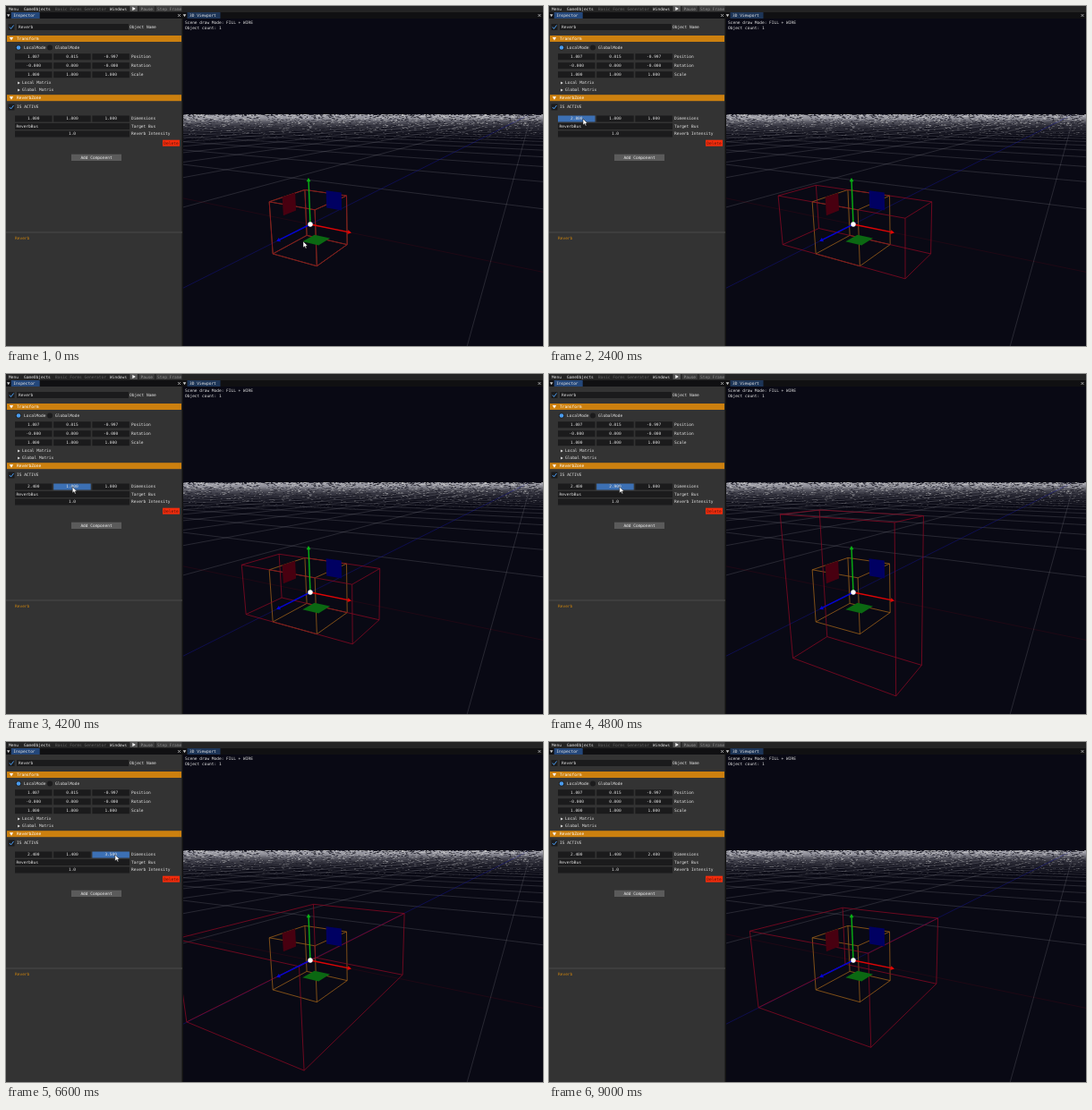
Write an HTML page with a canvas that moves like this. It is 600 px wide and 380 px high and loops after 9.4 s.

```html
<!DOCTYPE html>
<html>
<head>
<meta charset="utf-8">
<style>
  html, body { margin: 0; width: 100%; height: 100%; overflow: hidden; background: #000; }
  canvas { display: block; }
</style>
</head>
<body>
<canvas id="stage" width="600" height="380"></canvas>
<script>
const LOOP = 9400;
const view = document.getElementById('stage').getContext('2d');
let g = view;

// The camera is fixed by its focal length and the vanishing points of the x and z axes
const FOCAL = 345, CX = 399, CY = 197, HORIZON = 120, DEPTH = 5.8;
const unit = v => v.map(c => c / Math.hypot(...v));
const RISE = CY - HORIZON;
const AX = unit([663, RISE, -FOCAL]);
const AY = unit([0, -FOCAL, -RISE]);
const AZ = unit([-188.4, RISE, -FOCAL]);
const ORIGIN = [340, 244];
const CENTRE = [(ORIGIN[0] - CX) * DEPTH / FOCAL, (ORIGIN[1] - CY) * DEPTH / FOCAL, DEPTH];

const toCamera = (x, y, z) => CENTRE.map((c, i) => c + x * AX[i] + y * AY[i] + z * AZ[i]);
const toScreen = p => [CX + FOCAL * p[0] / p[2], CY + FOCAL * p[1] / p[2]];
const project = (x, y, z) => toScreen(toCamera(x, y, z));

function rect(x, y, w, h, color) {
  g.fillStyle = color;
  g.fillRect(x, y, w, h);
}

function line(a, b, color, width = 1) {
  g.strokeStyle = color;
  g.lineWidth = width;
  g.beginPath();
  g.moveTo(...a);
  g.lineTo(...b);
  g.stroke();
}

function poly(points, color) {
  g.fillStyle = color;
  g.beginPath();
  points.forEach(p => g.lineTo(...p));
  g.closePath();
  g.fill();
}

function triangle(x, y, r, angle, color) {
  const tip = i => angle + i * Math.PI * 2 / 3;
  poly([0, 1, 2].map(i => [x + r * Math.cos(tip(i)), y + r * Math.sin(tip(i))]), color);
}

function disc(x, y, r, color) {
  g.fillStyle = color;
  g.beginPath();
  g.arc(x, y, r, 0, Math.PI * 2);
  g.fill();
}

function text(s, x, y, color = '#e4e4e4', align = 'left') {
  g.font = '4.5px "DejaVu Sans Mono", monospace';
  g.textBaseline = 'middle';
  g.textAlign = align;
  g.fillStyle = color;
  g.fillText(s, x, y + .3);
}

function clipToViewport(top) {
  g.save();
  g.beginPath();
  g.rect(198, top, 402, 380 - top);
  g.clip();
}

function groundLine(x0, z0, x1, z1, color) {
  const a = toCamera(x0, 0, z0), b = toCamera(x1, 0, z1), near = .2;
  if (a[2] < near && b[2] < near) return;
  const clip = (p, q) => {
    if (p[2] >= near) return p;
    const k = (near - p[2]) / (q[2] - p[2]);
    return p.map((v, i) => v + (q[i] - v) * k);
  };
  line(toScreen(clip(a, b)), toScreen(clip(b, a)), color, .9);
}

function drawGround() {
  rect(198, 14, 402, 366, '#090914');
  clipToViewport(HORIZON + 1);
  const far = 120, step = 3.16, gray = 'rgba(155,155,165,.24)';
  for (let i = -far; i <= far; i++) {
    const d = i * step, end = far * step;
    groundLine(d, -end, d, end, i ? gray : 'rgba(20,20,150,.5)');
    groundLine(-end, d, end, d, i ? gray : 'rgba(90,10,25,.3)');
  }
  // Shimmer of the grid near the horizon
  let seed = 7;
  const rnd = () => (seed = seed * 16807 % 2147483647) / 2147483647;
  for (let i = 0; i < 2600; i++) {
    const k = rnd() ** 2, x = 198 + rnd() * 402, y = HORIZON + 1 + k * 32;
    const shade = rnd() < .45 ? '205,205,205' : '9,9,20';
    rect(Math.floor(x), Math.floor(y), 1 + rnd() * 2, 1, `rgba(${shade},${.5 * (1 - k)})`);
  }
  g.restore();
}

const FIELD = '#1b1b1c', FIELD_W = 41.5, ROW_DIMS = 126;
const column = i => 10 + 43.2 * i;

function field(x, y, w, value, color = FIELD) {
  rect(x, y - 3.5, w, 7, color);
  text(value, x + w / 2, y, '#e4e4e4', 'center');
}

function vectorRow(y, values, label) {
  values.forEach((v, i) => field(column(i), y, FIELD_W, v));
  text(label, 140, y);
}

function checkbox(y) {
  rect(2.5, y - 3.5, 7, 7, FIELD);
  line([4, y], [5.5, y + 2], '#4a9cf0');
  line([5.5, y + 2], [8.5, y - 2], '#4a9cf0');
}

function radio(x, label, on) {
  disc(x, 46.5, 3, FIELD);
  if (on) disc(x, 46.5, 2.3, '#4a9cf0');
  text(label, x + 6, 46.5);
}

function header(y, label) {
  rect(1, y - 3.5, 195, 7, '#cc800f');
  triangle(6, y - .3, 2.4, Math.PI / 2, '#fff');
  text(label, 12, y, '#fff');
}

function titleTab(x, w, label, closeX, color) {
  rect(x + 5, 7, w, 7, color);
  triangle(x + 2, 10.2, 2, Math.PI / 2, '#ccc');
  text(label, x + 7.5, 10.5);
  for (const s of [-1.5, 1.5]) line([closeX - 1.5, 10.5 - s], [closeX + 1.5, 10.5 + s], '#ccc', .7);
}

function drawMenu() {
  rect(0, 0, 600, 7, '#242424');
  rect(138.5, 0, 8.5, 6, '#555');
  rect(148.5, 0, 17.5, 6, '#3c3c3c');
  rect(167.5, 0, 29, 6, '#3c3c3c');
  triangle(142.5, 3, 2.4, 0, '#fff');
  const y = 3.5;
  text('Menu', 3, y);
  text('GameObjects', 20, y);
  text('Basic Forms Generator', 55, y, '#646464');
  text('Windows', 116, y);
  text('Pause', 150.5, y, '#999');
  text('Step Frame', 169, y, '#888');
}

function drawPanels() {
  rect(0, 0, 198, 380, '#333');
  drawMenu();
  rect(0, 7, 600, 7, '#101012');
  rect(196.5, 7, 1.5, 373, '#121212');
  titleTab(.7, 32, 'Inspector', 193.5, '#24477a');
  titleTab(197.5, 37, '3D Viewport', 596, '#1d3557');

  checkbox(23.5);
  rect(12, 20, 125, 7, FIELD);
  text('Reverb', 14, 23.5);
  text('Object Name', 138, 23.5);
  header(36.5, 'Transform');
  radio(14, 'LocalMode', true);
  radio(49, 'GlobalMode', false);
  vectorRow(56.7, ['1.007', '0.015', '-0.997'], 'Position');
  vectorRow(66.7, ['-0.000', '0.000', '-0.000'], 'Rotation');
  vectorRow(76.7, ['1.000', '1.000', '1.000'], 'Scale');
  ['Local Matrix', 'Global Matrix'].forEach((s, i) => {
    triangle(14, 86 + 8 * i, 1.8, 0, '#e4e4e4');
    text(s, 18, 86 + 8 * i);
  });

  header(102.7, 'ReverbZone');
  checkbox(113);
  text('IS ACTIVE', 12, 113);
  text('Dimensions', 140, ROW_DIMS);
  field(10, 134.5, 128, '');
  text('ReverbBus', 11.5, 134.5);
  text('Target Bus', 140, 134.5);
  field(10, 143, 128, '1.0');
  text('Reverb Intensity', 140, 143);
  rect(175, 149.7, 19, 7, '#f42c0c');
  text('Delete', 184.5, 153.3, '#57150c', 'center');
  rect(73, 165.7, 56, 7.3, '#5b5b5b');
  text('Add Component', 101, 169.3, '#f0f0f0', 'center');
  rect(0, 252.5, 197, 1, '#4a4a4a');
  text('Reverb', 10, 259.3, '#c9820f');
  text('Scene draw Mode: FILL + WIRE', 200, 18.3);
  text('Object count: 1', 200, 24.8);
}

function drawBox(dims, color) {
  const corner = i => project(...dims.map((d, axis) => i >> axis & 1 ? d / 2 : -d / 2));
  for (let i = 0; i < 8; i++) {
    for (const bit of [1, 2, 4]) {
      if (!(i & bit)) line(corner(i), corner(i | bit), color, .8);
    }
  }
}

function drawGizmo() {
  const near = .38, far = .7, tip = .87;
  const onAxis = (axis, d) => [0, 1, 2].map(i => i === axis ? d : 0);
  // One handle per plane, named by the axis it faces
  ['#480010', '#0b6812', '#000062'].forEach((color, axis) => {
    const at = (a, b) => {
      const p = [0, 0, 0];
      p[(axis + 1) % 3] = a;
      p[(axis + 2) % 3] = b;
      return project(...p);
    };
    poly([at(near, near), at(far, near), at(far, far), at(near, far)], color);
  });
  ['#e00505', '#08b014', '#0505d0'].forEach((color, axis) => {
    const end = project(...onAxis(axis, tip));
    const angle = Math.atan2(end[1] - ORIGIN[1], end[0] - ORIGIN[0]);
    line(ORIGIN, end, color, 1.4);
    triangle(end[0] - 1.5 * Math.cos(angle), end[1] - 1.5 * Math.sin(angle), 2.8, angle, color);
  });
  disc(...ORIGIN, 2.7, '#fff');
}

// Each drag pulls one dimension up from 1 to its peak, holds, then settles at rest
const DRAGS = [
  { start: 1800, top: 3000, release: 3000, end: 3600, peak: 4.5, rest: 2.4, pull: 4 },
  { start: 4200, top: 4700, release: 4800, end: 5100, peak: 2.9, rest: 1.4, pull: 2.4 },
  { start: 5400, top: 5700, release: 7500, end: 8000, peak: 3.78, rest: 2.4, pull: 1.8 }
];
const progress = (t, a, b) => Math.min(1, Math.max(0, (t - a) / (b - a)));
const mix = (a, b, k) => a + (b - a) * k;

function sizeAt({ start, top, release, end, peak, rest }, t) {
  if (t < top) return mix(1, peak, progress(t, start, top));
  if (t < release) {
    const sway = release - top > 500 ? .4 : 0;
    return peak - sway * Math.sin(Math.PI * Math.sqrt(progress(t, top, release)));
  }
  return mix(rest, peak, (1 - progress(t, release, end)) ** 2);
}

function pointerAt(t) {
  const held = (i, time) => [column(i) + 21 + (sizeAt(DRAGS[i], time) - 1) * DRAGS[i].pull, ROW_DIMS];
  const glide = (a, b, k) => a.map((v, j) => mix(v, b[j], k));
  const next = DRAGS.findIndex(d => t < d.end);
  if (next < 0) return glide(held(2, t), [393, 382], progress(t, 8300, 9000));
  const { start } = DRAGS[next];
  if (t >= start) return held(next, t);
  return next
    ? glide(held(next - 1, t), held(next, t), progress(t, DRAGS[next - 1].end, start))
    : glide([332, 263], held(0, t), progress(t, 0, 1300));
}

function drawPointer(x, y) {
  poly([[0, 0], [0, 7], [1.7, 5.6], [2.9, 8], [4, 7.5], [2.9, 5.2], [5, 5]]
    .map(p => [x + p[0], y + p[1]]), '#fff');
  g.strokeStyle = '#111';
  g.lineWidth = .5;
  g.stroke();
}

const backdrop = document.createElement('canvas');
backdrop.width = 600;
backdrop.height = 380;
g = backdrop.getContext('2d');
drawGround();
drawPanels();
g = view;

function draw(t) {
  g.drawImage(backdrop, 0, 0);
  const dims = DRAGS.map(d => sizeAt(d, t));
  const [px, py] = pointerAt(t);

  clipToViewport(14);
  drawBox([1, 1, 1], '#9c6019');
  drawBox(dims, '#860a22');
  drawGizmo();
  g.restore();

  dims.forEach((d, i) => {
    const x = column(i), active = t >= DRAGS[i].start && t < DRAGS[i].end;
    const hovered = px >= x && px < x + FIELD_W && Math.abs(py - ROW_DIMS) < 4;
    const color = active ? '#3c70b4' : hovered ? '#2a5080' : FIELD;
    field(x, ROW_DIMS, FIELD_W, d.toFixed(1) + '00', color);
  });
  if (t < 9000) drawPointer(px, py);
}

function tick() {
  draw(Math.floor(performance.now() % LOOP / 100) * 100);
  requestAnimationFrame(tick);
}
tick();
</script>
</body>
</html>
```
